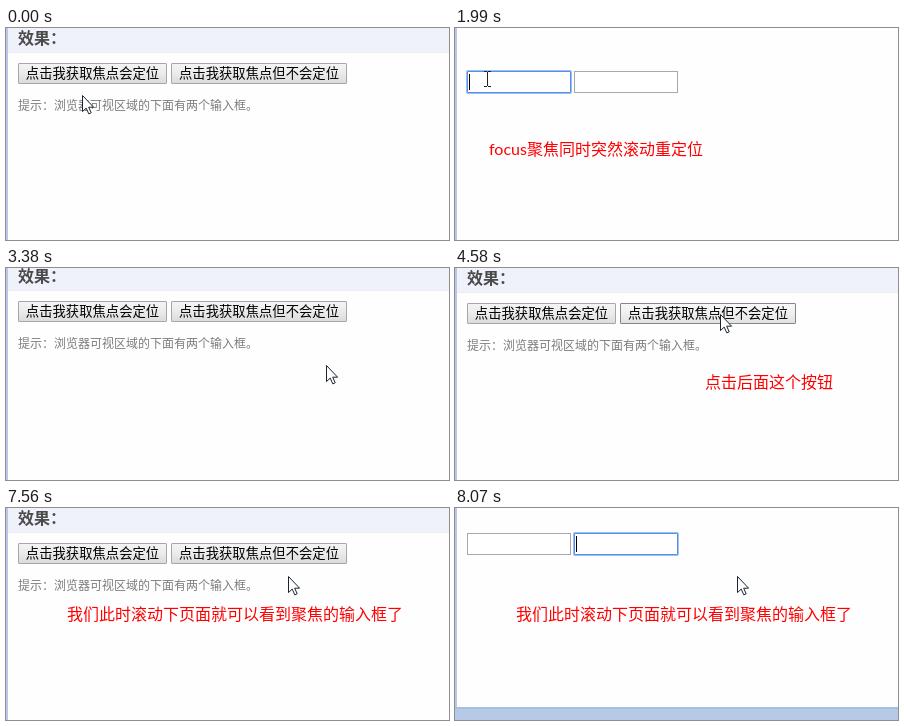
Animation of 443 by 212 pixels, one loop 9910 ms. Source, as an HTML page:

```html
<!DOCTYPE html>
<html lang="zh-CN">
<head>
<meta charset="utf-8">
<title>focus</title>
<style>
html, body { margin: 0; width: 100%; height: 100%; overflow: hidden; background: #fefefe; }
body { font-family: "Noto Sans CJK SC", "Noto Sans CJK", sans-serif; }
#stage { position: relative; width: 443px; height: 212px; overflow: hidden; }
#stage div, #stage svg { position: absolute; box-sizing: border-box; white-space: nowrap; }
#page { left: 0; top: 0; width: 443px; height: 800px; }
.side { left: 0; top: -30px; width: 2px; height: 800px; background: #bac5ea; }
.head { left: 2px; top: -30px; width: 441px; height: 55px; border-bottom: 1px solid #eee; background: #eff2fb; }
.title { left: 12px; top: -2px; font: bold 16px/22px "Noto Sans CJK SC", "Noto Sans CJK", sans-serif; color: #4a4a4a; }
.btn {
  top: 35px; height: 21px; border: 1px solid #a6a6a6; border-radius: 1px;
  background: linear-gradient(#f4f4f4, #ececec 45%, #dcdcdc);
  font-size: 13.333px; line-height: 18px; text-align: center; color: #000;
}
.btn.over { border-color: #868686; background: linear-gradient(#f8f8f8, #f0f0f0 45%, #e2e2e2); }
.btn.down { border-color: #868686; background: linear-gradient(#d6d6d6, #e2e2e2 55%, #e8e8e8); }
.hint { left: 12px; top: 67px; font-size: 12px; line-height: 20px; color: #7c7c7c; }
.field { top: 502px; width: 104px; height: 22px; border: 1px solid #a9a9a9; background: #fff; }
.field.focus { border-color: #5590e8; border-radius: 1px; box-shadow: 0 0 0 1px #9dc0f4; }
.caret { left: 1px; top: 2px; width: 1px; height: 16px; background: #000; visibility: hidden; }
.foot { left: 0; top: 676px; width: 443px; height: 100px; border-top: 2px solid #a9bfe0; background: #b6c9e6; }
.note { font-size: 16px; line-height: 22px; color: #f00; visibility: hidden; }
.note span { font-family: Lato, sans-serif; line-height: 0; }
#arrow, #beam { left: 0; top: 0; width: 1px; height: 1px; overflow: visible; }
</style>
</head>
<body>
<div id="stage">
  <div id="page">
    <div class="side"></div>
    <div class="head"></div>
    <div class="title">效果：</div>
    <div class="btn" style="left:12px;width:149px">点击我获取焦点会定位</div>
    <div class="btn" style="left:165px;width:176px">点击我获取焦点但不会定位</div>
    <div class="hint">提示：浏览器可视区域的下面有两个输入框。</div>
    <div class="field" style="left:12px"><div class="caret"></div></div>
    <div class="field" style="left:119px"><div class="caret"></div></div>
    <div class="foot"></div>
  </div>
  <div class="note" style="left:34px;top:109px"><span>focus</span>聚焦同时突然滚动重定位</div>
  <div class="note" style="left:250px;top:102px">点击后面这个按钮</div>
  <div class="note" style="left:237px;top:92px">此时输入框已经聚焦，<br>但是页面没有滚动定位</div>
  <div class="note" style="left:61px;top:94px">我们此时滚动下页面就可以看到聚焦的输入框了</div>
  <svg id="arrow"><path d="M.5 .5V16.6L4.2 13.1L6.8 18.9L9.2 17.8L6.7 12.2H11.6Z" fill="#fff" stroke="#1c2233"/></svg>
  <svg id="beam"><path d="M-3 -7.5H0M1 -7.5H4M.5 -7V7M-3 7.5H0M1 7.5H4" fill="none" stroke="#222" shape-rendering="crispEdges"/></svg>
</div>
<script>
const LOOP = 9910;
const JUMP = 459, END = 477;
const $ = s => document.querySelector(s), all = s => [...document.querySelectorAll(s)];
const page = $('#page'), arrow = $('#arrow'), beam = $('#beam');
const buttons = all('.btn'), fields = all('.field'), carets = all('.caret'), notes = all('.note');

const noteTimes = [[950, 2870], [3610, 5880], [5880, 7560], [7560, LOOP]];
const pressTimes = [[630, 870], [5110, 5440]];

// start, end, steps, target x, y, optional control point
const moves = [
  [60, 200, 3, 80, 50],
  [490, 630, 3, 81, 48],
  [1570, 1620, 2, 84, 86],
  [1760, 1990, 4, 32, 51, 126, -32],
  [2060, 2210, 3, 58, 48],
  [2350, 2710, 6, 185, 72, 110, 44],
  [2870, 3380, 8, 320, 97],
  [4130, 4580, 7, 265, 46, 395, 65],
  [4960, 4960, 1, 265, 44],
  [5800, 5880, 2, 282, 68]
];

const within = (t, [a, b]) => t >= a && t < b;
const show = (el, on) => { el.style.visibility = on ? 'visible' : 'hidden'; };
const place = (el, x, y) => { el.style.transform = `translate(${x}px,${y}px)`; };

// Stepped progress: the first step lands on start, the last on end
function progress(t, start, end, steps) {
  if (t < start) return 0;
  if (t >= end) return 1;
  return Math.min(steps, Math.floor((t - start) / (end - start) * (steps - 1) + .1) + 1) / steps;
}
const easeOut = p => 1 - (1 - p) ** 2.5;

function pointer(t) {
  let x = 76, y = 67;
  for (const [a, b, n, tx, ty, cx = (x + tx) / 2, cy = (y + ty) / 2] of moves) {
    const p = progress(t, a, b, n), q = 1 - p;
    if (!p) break;
    x = q * q * x + 2 * p * q * cx + p * p * tx;
    y = q * q * y + 2 * p * q * cy + p * p * ty;
  }
  return [Math.round(x), Math.round(y)];
}

function scrollAt(t) {
  if (t < 870) return 0;
  if (t < 5000) return JUMP * (1 - easeOut(progress(t, 2870, 3460, 9)));
  return END * easeOut(progress(t, 7620, 8070, 7));
}

function hit(el, x, y) {
  const l = el.offsetLeft, u = el.offsetTop;
  return x >= l && x < l + el.offsetWidth && y >= u && y < u + el.offsetHeight;
}

function draw(t) {
  const scroll = Math.round(scrollAt(t)), [x, y] = pointer(t);
  place(page, 0, -scroll);

  buttons.forEach((b, i) => {
    const down = within(t, pressTimes[i]);
    b.classList.toggle('down', down);
    b.classList.toggle('over', !down && hit(b, x, y + scroll));
  });

  const focused = t < 870 ? -1 : t < 5440 ? 0 : 1;
  fields.forEach((f, i) => f.classList.toggle('focus', i === focused));
  show(carets[0], focused === 0 && Math.floor((t - 870) / 515) % 2 === 0);
  show(carets[1], focused === 1);

  notes.forEach((n, i) => show(n, within(t, noteTimes[i])));

  const text = fields.some(f => hit(f, x, y + scroll));
  show(beam, text);
  show(arrow, !text);
  place(text ? beam : arrow, x, y);
}

function tick() {
  draw(performance.now() % LOOP);
  requestAnimationFrame(tick);
}
tick();
</script>
</body>
</html>
```
